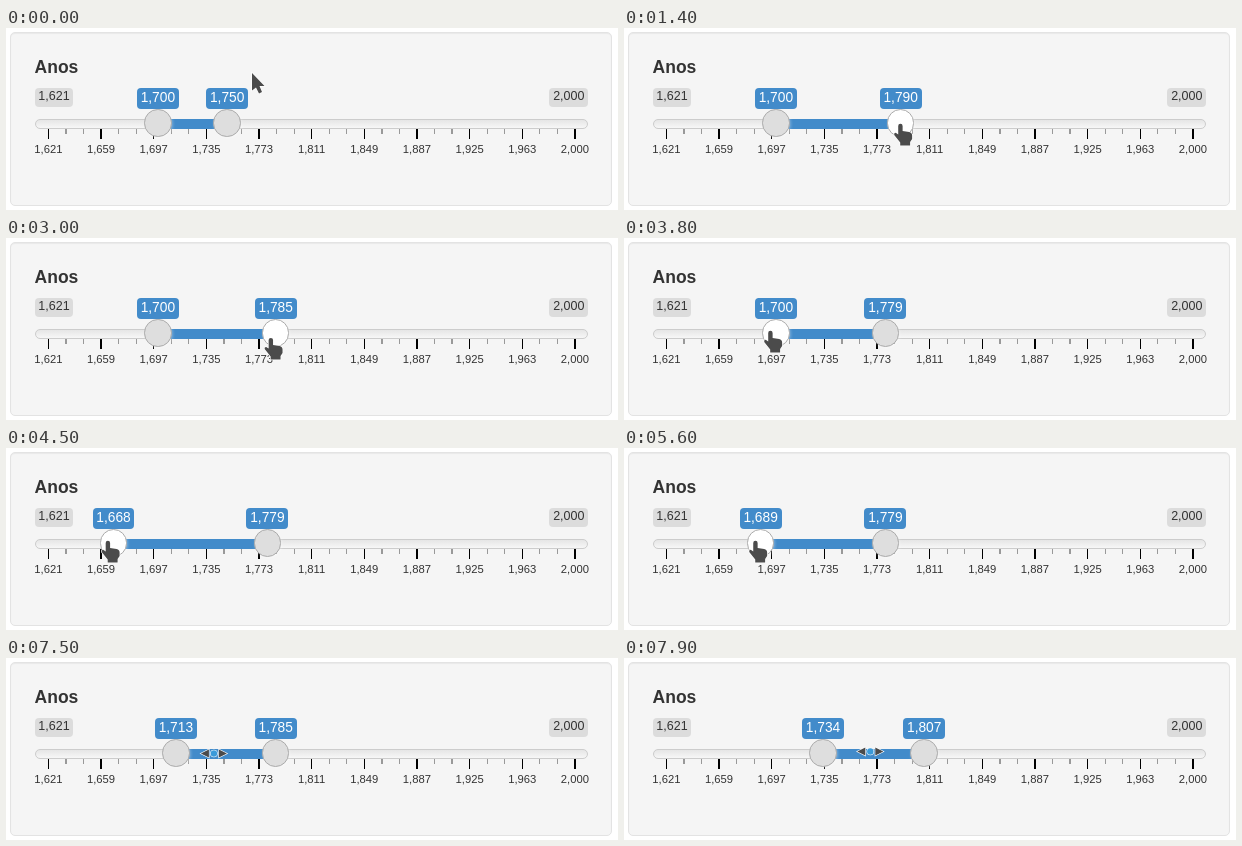
Animation of 612x182 px, one loop 8000 ms. Source, as an HTML page:

```html
<!DOCTYPE html>
<html lang="pt">
<head>
<meta charset="utf-8">
<title>Anos</title>
<style>
  html, body { margin: 0; width: 100%; height: 100%; overflow: hidden; background: #fff; }
  body { position: relative; font-family: "Liberation Sans", Arial, sans-serif; color: #333; }
  div, svg { position: absolute; box-sizing: border-box; white-space: nowrap; }
  #panel { left: 4px; top: 4px; width: 602px; height: 174px; background: #f5f5f5;
    border: 1px solid #e3e3e3; border-radius: 5px; box-shadow: inset 0 1px 1px rgba(0,0,0,.05); }
  #title { left: 28.6px; top: 29px; font-size: 17.5px; font-weight: bold; line-height: 20px; }
  #line { left: 28.6px; top: 91px; width: 553.5px; height: 10px; border: 1px solid #ccc; border-radius: 16px;
    background: linear-gradient(#ddd -50%, #fff 150%); }
  #bar { top: 91px; height: 10px; background: #428bca; }
  .tag { top: 60px; border-radius: 4px; }
  .limit { padding: 1.25px 3.75px 3.25px; font-size: 12.5px; line-height: 14.7px; background: rgba(0,0,0,.1); }
  .value { padding: 1.25px 3.75px; font-size: 13.75px; line-height: 1.333; color: #fff; background: #428bca; }
  .handle { top: 81.25px; width: 27.5px; height: 27.5px; border: 1px solid #aaa; border-radius: 50%;
    background: #dedede; box-shadow: 1px 1px 3px rgba(255,255,255,.3); }
  .handle.hover { background: #fff; }
  .tick { top: 101px; width: 1.25px; height: 5px; background: #999; }
  .tick.big { height: 10px; background: #000; }
  .label { top: 115px; width: 40px; text-align: center; font-size: 11.25px; line-height: 13px; }
  svg { left: 0; top: 0; }
  #cursor > * { fill: #4b4b4b; stroke: #fff; stroke-width: 1.2; paint-order: stroke; }
  #cursor circle { fill: #3a9ad9; }
</style>
</head>
<body>
<div id="panel"></div>
<div id="title">Anos</div>
<div id="line"></div>
<div id="bar"></div>
<div class="tag limit" style="left:28.6px">1,621</div>
<div class="tag limit" style="right:29.8px">2,000</div>
<div id="grid"></div>
<div class="handle"></div>
<div class="handle"></div>
<div class="tag value"></div>
<div class="tag value"></div>
<svg width="612" height="182">
  <g id="cursor">
    <path id="arrow" d="M0 0V17.5L4 14.5L7 20.5L10 19L7.5 13H12.5Z"/>
    <path id="hand" d="M-2 2a2.2 2.2 0 0 1 4.4 0V7l6.5 1q3 .5 3 3.5V15l-2 3v3.5H0v-3L-6 11q-.5-2.2 1.5-2.2L-2 10.5z"/>
    <g id="move"><path d="M-13 0l8-4v8zM13 0l-8-4v8z"/><circle r="3.2"/></g>
  </g>
</svg>
<script>
const MIN = 1621, MAX = 2000, LOOP = 8000, STEP = 100;
const LEFT = 42.35, UNIT = 525.5 / (MAX - MIN);
const GRID_LEFT = 41.8, GRID_STEP = 17.55, GRID_COUNT = 30;
const $ = id => document.getElementById(id);
const handles = document.querySelectorAll('.handle');
const tags = document.querySelectorAll('.value');

const format = v => v.toLocaleString('en-US');
const valueToX = v => LEFT + (v - MIN) * UNIT;

// Progress from 0 to 1 between two times; a higher power slows the end more.
function ramp(t, start, end, power = 1) {
  const p = Math.min(1, Math.max(0, (t - start) / (end - start)));
  return 1 - (1 - p) ** power;
}
const bump = p => Math.sin(Math.PI * p);

function addToGrid(className, left, text = '') {
  const el = document.createElement('div');
  el.className = className;
  el.style.left = left + 'px';
  el.textContent = text;
  $('grid').append(el);
}

for (let i = 0; i <= GRID_COUNT; i++) {
  const x = GRID_LEFT + i * GRID_STEP, big = i % 3 === 0;
  addToGrid(big ? 'tick big' : 'tick', x);
  if (big) addToGrid('label', x - 19.4, format(Math.ceil(MIN + i * (MAX - MIN) / GRID_COUNT)));
}

function pose(t) {
  const sag = ramp(t, 2100, 3200), cross = ramp(t, 3300, 3800);
  const leave = ramp(t, 6300, 6900), slide = ramp(t, 7400, 7900);
  const toDrag = 71 * ramp(t, 1000, 1900, 1.4) - 42 * ramp(t, 2100, 3200, 1.14);
  const fromDrag = -39 * ramp(t, 4100, 4900, 2.5) + 47 * ramp(t, 5000, 6000);
  return {
    values: [1700 + fromDrag + 26 * slide, 1750 + toDrag + 28 * slide].map(Math.round),
    px: 246 - 25 * ramp(t, 100, 600) + UNIT * (toDrag + fromDrag) - 6 * sag - 109 * cross
      + 41 * ramp(t, 6300, 6900, 3) + 48 * slide,
    py: 45 + 51 * ramp(t, 100, 500) + 5 * sag - 8 * cross + 16 * bump(cross)
      + 3 * leave - 3 * bump(leave) - 2.5 * slide
  };
}

function draw(t) {
  const { values, px, py } = pose(t);
  const xs = values.map(valueToX);
  let kind = py > 90 && py < 101 && px > xs[0] && px < xs[1] ? 'move' : 'arrow';

  xs.forEach((x, i) => {
    const hover = Math.hypot(px - x, py - 95) < 14;
    if (hover) kind = 'hand';
    handles[i].classList.toggle('hover', hover);
    handles[i].style.left = x - 13.75 + 'px';
    tags[i].textContent = format(values[i]);
    tags[i].style.left = x - 21 + 'px';
  });
  $('bar').style.left = xs[0] + 'px';
  $('bar').style.width = xs[1] - xs[0] + 'px';

  for (const id of ['arrow', 'hand', 'move']) $(id).style.display = id === kind ? '' : 'none';
  $('cursor').setAttribute('transform', `translate(${px} ${py})`);
}

const start = performance.now();
function tick() {
  const t = (performance.now() - start) % LOOP;
  draw(Math.floor(t / STEP) * STEP);
  requestAnimationFrame(tick);
}
tick();
</script>
</body>
</html>
```
